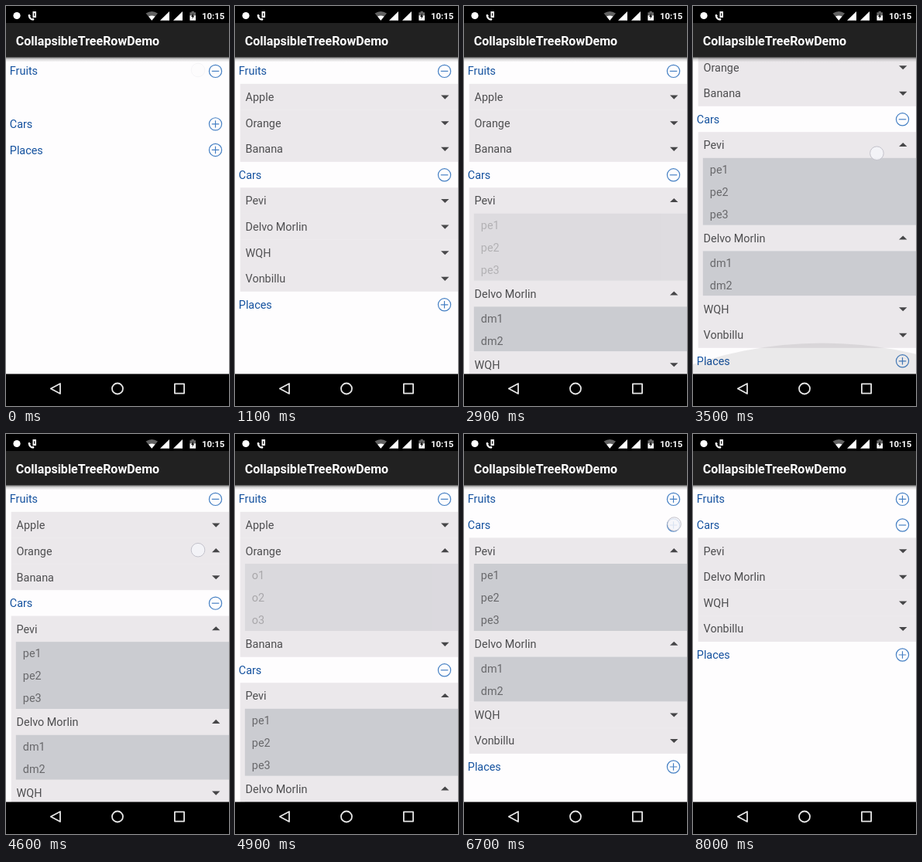
Recreate the animation shown at these times as an HTML page. Size 288 px wide and 518 px high, loop 8.1 s.

```html
<!DOCTYPE html>
<html lang="en">
<head>
<meta charset="utf-8">
<title>Expandable list</title>
<style>
html, body { margin: 0; width: 100%; height: 100%; overflow: hidden; background: #fefdfe; }
svg { display: block; width: 288px; height: 518px; font-family: Roboto, sans-serif; font-size: 14.4px; }
.group { fill: #15529f; }
.kid { fill: #4e4e50; }
.sub { fill: #68686b; }
.ring { fill: none; stroke: #4680c4; stroke-width: 1.2; }
.nav { fill: none; stroke: #e6e6e6; stroke-width: 1.8; stroke-linejoin: round; }
.strong { font-weight: 600; fill: #fff; }
</style>
</head>
<body>
<svg viewBox="0 0 288 518">
  <defs>
    <clipPath id="view"><rect y="66" width="288" height="411"/></clipPath>
    <linearGradient id="shade" x2="0" y2="1">
      <stop stop-color="#000" stop-opacity=".5"/>
      <stop offset=".4" stop-color="#000" stop-opacity=".15"/>
      <stop offset="1" stop-color="#000" stop-opacity="0"/>
    </linearGradient>
  </defs>
  <rect width="288" height="518" fill="#fefdfe"/>
  <g clip-path="url(#view)">
    <g id="list"></g>
    <circle id="glowBottom" cx="167" r="520" fill-opacity=".08"/>
    <circle id="glowTop" cx="167" r="520" fill-opacity=".08"/>
    <rect y="66.6" width="288" height="6" fill="url(#shade)"/>
  </g>
  <circle id="touch" r="8.8" fill="#f5f4f9" fill-opacity=".85" stroke="#c3c2cb"/>

  <rect width="288" height="22"/>
  <rect y="22" width="288" height="44.6" fill="#212121"/>
  <text class="strong" x="12.8" y="51" font-size="16">CollapsibleTreeRowDemo</text>
  <g fill="#fff">
    <circle cx="14" cy="12.5" r="4.6"/>
    <path d="M28.5 11.5l2-.8 1.4 2-.8 1.1q1 1.7 2.6 2.6l1.2-.8 1.7 1.5-1.1 1.7q-6.3-.5-7-7.3z"/>
    <path d="M34.5 7h4.5v8h-4.5z"/>
    <path d="M36.2 9.2h1.2v3.5h-1.2z" fill="#000"/>
    <path d="M188.3 18.8L180.6 9.5q7.7-5 15.4 0z" fill="#626262"/>
    <path d="M188.3 18.8l-4.2-5.2q4.2-2.4 8.4 0z"/>
    <path d="M199 18.8h12V7zM216 18.8h12V7z"/>
    <path d="M239.6 6.8h3.2v1.4h2.2v4h-7.6v-4h2.2z" fill="#666"/>
    <path d="M237.4 12.2h7.6v6.5h-7.6z"/>
    <path d="M241.8 9l-2.6 5h1.7l-.5 3 2.8-4.6h-1.8z" fill="#000"/>
    <text class="strong" x="253" y="17" font-size="11.4">10:15</text>
  </g>
  <rect y="476.5" width="288" height="42"/>
  <g class="nav">
    <path d="M57.8 495.5l12.2-6.5v13z"/>
    <circle cx="144" cy="495.5" r="7"/>
    <rect x="217.9" y="489.4" width="12.2" height="12.2"/>
  </g>
</svg>
<script>
const LOOP = 8100, STEP = 100, ROW = 33.6, SUB = 29, TOP = 67.2, CLOSE_TIME = 500;
const $ = id => document.getElementById(id);

const numbered = (prefix, count) => Array.from({ length: count }, (_, i) => prefix + (i + 1));
const item = (label, subs = [], flips = []) => ({ label, subs, flips });

// flips: times at which a row opens, closes, opens again...
const tree = [
  { label: 'Fruits', flips: [-96, 5400], kids: [
    item('Apple'),
    item('Orange', numbered('o', 3), [4590]),
    item('Banana')] },
  { label: 'Cars', flips: [700, 6700, 7500], kids: [
    item('Pevi', numbered('pe', 3), [2600]),
    item('Delvo Morlin', numbered('dm', 2), [1590]),
    item('WQH'),
    item('Vonbillu')] },
  { label: 'Places', flips: [], kids: [] }
];

function add(parent, tag, attrs, text) {
  const el = document.createElementNS('http://www.w3.org/2000/svg', tag);
  set(el, attrs);
  if (text) el.textContent = text;
  parent.append(el);
  return el;
}
function set(el, attrs) {
  for (const k in attrs) el.setAttribute(k, attrs[k]);
}
const box = (p, x, height, fill) => add(p, 'rect', { x, width: 288 - x, height, fill });
const label = (p, cls, x, y, text) => add(p, 'text', { class: cls, x, y }, text);
const moveTo = (el, y) => set(el, { transform: `translate(0 ${y.toFixed(2)})` });

function build() {
  for (const group of tree) {
    group.body = add($('list'), 'g');
    group.row = add($('list'), 'g');
    label(group.row, 'group', 4.8, 22.3, group.label);
    add(group.row, 'circle', { class: 'ring', cx: 270.5, cy: 17.2, r: 8.1 });
    group.icon = add(group.row, 'path', { class: 'ring' });
    for (const kid of group.kids) {
      kid.row = add(group.body, 'g');
      kid.back = box(kid.row, 6.7, ROW, '#ebe8eb');
      label(kid.row, 'kid', 13.6, 22.3, kid.label);
      kid.icon = add(kid.row, 'path', { fill: '#464648' });
      kid.body = add(kid.row, 'g');
      moveTo(kid.body, ROW);
      box(kid.body, 12.8, kid.subs.length * SUB, '#cbccd1');
      kid.subs.forEach((s, i) => label(kid.body, 'sub', 21.8, i * SUB + 20.3, s));
    }
  }
}

// Eased progress from 0 to 1 between two times
function ramp(t, from, to) {
  const p = Math.min(1, Math.max(0, (t - from) / (to - from)));
  return (1 - Math.cos(Math.PI * p)) / 2;
}

// Opening makes room, then fades in; closing fades out, then closes up
function stateOf({ flips }, t) {
  const passed = flips.filter(f => t >= f);
  const age = t - passed.at(-1);
  if (!passed.length) return { on: false, open: 0, alpha: 0 };
  if (passed.length % 2) return { on: true, open: ramp(age, 0, 240), alpha: ramp(age, 200, 420) };
  return { on: false, open: 1 - ramp(age, 240, CLOSE_TIME), alpha: 1 - ramp(age, 0, 300) };
}

function layoutKids(group, t, top) {
  const reset = t >= group.flips[1] + CLOSE_TIME;
  let y = 0;
  for (const kid of group.kids) {
    const { on, open, alpha } = stateOf(reset ? { flips: [] } : kid, t);
    const height = ROW + kid.subs.length * SUB * open;
    kid.y = top + y;
    moveTo(kid.row, y);
    set(kid.back, { height: height + .2 });
    set(kid.icon, { d: on ? 'M266 18.8h10.4l-5.2-5.1z' : 'M266 14.8h10.4l-5.2 5.1z' });
    set(kid.body, { opacity: alpha });
    y += height;
  }
  return y;
}

function layoutList(t, scroll) {
  let y = TOP - scroll;
  for (const group of tree) {
    const { on, open, alpha } = stateOf(group, t);
    group.y = y;
    moveTo(group.row, y);
    set(group.icon, { d: 'M265.8 17.2h9.4' + (on ? '' : 'M270.5 12.5v9.4') });
    moveTo(group.body, y + ROW);
    set(group.body, { opacity: alpha });
    y += ROW + layoutKids(group, t, y + ROW) * open;
  }
}

// Overscroll arcs swell when the list hits an end
function drawGlow(t) {
  const low = ramp(t, 3400, 3500) - ramp(t, 3500, 3800);
  const high = ramp(t, 3950, 4100) - ramp(t, 4100, 4200);
  set($('glowBottom'), { cy: 996.5 - 40 * low });
  set($('glowTop'), { cy: -454 + 36 * high });
}

// The finger rests on each row it flips, and follows the list while dragging
function fingerAt(t, scroll) {
  if (t >= 3400 && t < 4100) return { cx: 237.4, cy: 262.7 - scroll, opacity: 1 };
  for (const node of tree.flatMap(g => [g, ...g.kids])) {
    const i = node.flips.findIndex(f => t >= f - 90 && t < f + 110);
    if (i < 0) continue;
    const left = node.flips[i] + 110 - t;
    return { cx: i % 2 ? 271.5 : 248, cy: node.y + ROW / 2 - 1, opacity: Math.min(1, left / 100) };
  }
  return { opacity: 0 };
}

function draw() {
  const t = Math.floor(performance.now() % LOOP / STEP) * STEP;
  const scroll = 72 * (ramp(t, 3300, 3500) - ramp(t, 3700, 4100));
  layoutList(t, scroll);
  drawGlow(t);
  set($('touch'), fingerAt(t, scroll));
  requestAnimationFrame(draw);
}

build();
draw();
</script>
</body>
</html>
```
